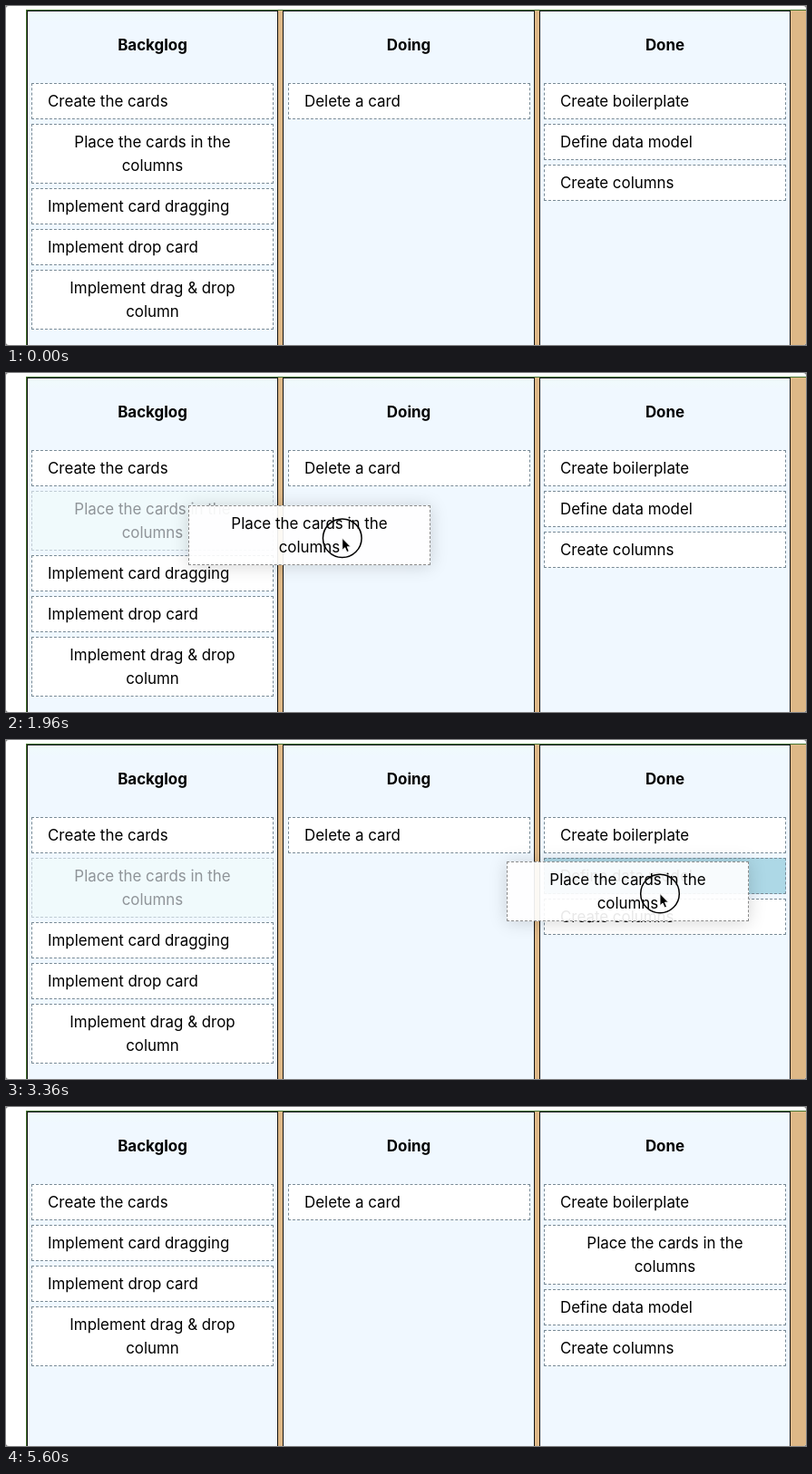
Animation, 882 px wide and 374 px high, one loop 6.02 s. Source, as an HTML page:

```html
<!DOCTYPE html>
<html lang="en">
<head>
<meta charset="utf-8">
<title>Card board</title>
<style>
  html, body { margin: 0; width: 100%; height: 100%; overflow: hidden; background: #777; }
  #stage {
    position: relative; width: 882px; height: 374px; overflow: hidden;
    background: #fff; border-radius: 3px;
    font: 16.9px/26px Inter, "Open Sans", sans-serif; color: #000;
  }
  #stage * { box-sizing: border-box; }
  #stage > *, .card { position: absolute; }
  #board { left: 22px; top: 4px; width: 880px; height: 400px; background: #deb887; border: 1px solid #44752f; }
  .col {
    top: 5px; height: 400px; border: 1px solid #111;
    background: linear-gradient(#f0fbfb, #f0f8ff 12px);
  }
  h2 { position: absolute; left: 0; right: 0; top: 24px; margin: 0; font: inherit; font-weight: 700; text-align: center; }
  .card {
    width: 267px; padding: 6px 17px; white-space: pre;
    background: #fff; border: 1px dashed #788a96;
  }
  .two { text-align: center; }
  .dim { opacity: .4; background: #f0fdfa; }
  .over { background: #add8e6; }
  #ghost {
    left: 0; top: 0; border-color: #8a8a8a;
    background: rgba(255, 255, 255, .91); box-shadow: 0 1px 18px rgba(0, 0, 0, .17);
  }
  #pointer { left: 0; top: 0; overflow: visible; }
</style>
</head>
<body>
<div id="stage">
  <div id="board"></div>
  <div id="ghost" class="card two"></div>
  <svg id="pointer" width="1" height="1">
    <circle id="ring" r="21.3" fill="none" stroke="#000" stroke-width="1.5"/>
    <path d="M0 0V13.2L3 10.5L5.1 15.4L7.5 14.4L5.4 9.6H9.4Z" fill="#000" stroke="#fff" stroke-width=".9"/>
  </svg>
</div>
<script>
const STEP = 70, LOOP = 6020;
const ENTER = 210, PRESS = 1470, LIFT = 1750, DROP = 4480, RELEASE = 4550, LEAVE = 5600;
const GRAB = { x: 169.3, y: 36 };
const CARD = { one: 40, two: 66, gap: 5 };

const linear = u => u;
const easeIn = u => u ** 1.6;
const easeOut = u => 1 - (1 - u) ** 3.2;

// The pointer rests between moves
const START = { x: 286, y: 253 };
const MOVES = [
  { from: ENTER, to: 630, x: 171, y: 144, ease: linear },
  { from: 700, to: 910, x: 219, y: 184, ease: linear },
  { from: 910, to: 1330, x: 196.5, y: 167, ease: linear },
  { from: 1610, to: 2100, x: 495, y: 193, ease: easeIn },
  { from: 2170, to: 2940, x: 684, y: 183, ease: easeOut },
  { from: 2940, to: 3780, x: 758, y: 156, ease: linear },
  { from: 3780, to: 4130, x: 767, y: 146, ease: linear },
  { from: 4970, to: 5180, x: 604, y: 274, ease: linear },
  { from: 5250, to: LEAVE, x: 460, y: 374, ease: linear }
];

const MOVED = 'Place the cards in the\ncolumns';
const COLUMNS = [
  ['Backglog', ['Create the cards', MOVED, 'Implement card dragging',
    'Implement drop card', 'Implement drag & drop\ncolumn']],
  ['Doing', ['Delete a card']],
  ['Done', ['Create boilerplate', 'Define data model', 'Create columns']]
];

const $ = id => document.getElementById(id);
const stage = $('stage'), ghost = $('ghost'), pointer = $('pointer'), ring = $('ring');
ghost.textContent = MOVED;

function add(parent, tag, cls, text = '') {
  const el = document.createElement(tag);
  el.className = cls;
  el.textContent = text;
  parent.append(el);
  return el;
}

const lists = COLUMNS.map(([title, texts], i) => {
  const shift = 282.5 * i, left = Math.floor(23 + shift);
  const col = add(stage, 'div', 'col');
  col.style.left = left + 'px';
  col.style.width = Math.ceil(300 + shift) - left + 'px';
  stage.insertBefore(col, ghost);
  add(col, 'h2', '', title);
  const cards = texts.map(text => add(col, 'div', text.includes('\n') ? 'card two' : 'card', text));
  return { col, cards, inset: Math.round(28 + shift) - left - 1 };
});
const [backlog, doing, done] = lists;
const moved = backlog.cards[1];
const [first, model, columns] = done.cards;

function stack({ col, inset }, cards) {
  let y = 79;
  for (const card of cards) {
    col.append(card);
    card.style.left = inset + 'px';
    card.style.top = y + 'px';
    y += (card.classList.contains('two') ? CARD.two : CARD.one) + CARD.gap;
  }
}

function arrange(dropped) {
  stack(backlog, backlog.cards.filter(card => !dropped || card !== moved));
  stack(doing, doing.cards);
  stack(done, dropped ? [first, moved, model, columns] : done.cards);
}

function pointerAt(t) {
  let p = START;
  for (const { from, to, x, y, ease } of MOVES) {
    if (t <= from) break;
    const k = ease(Math.min(1, (t - from) / (to - from)));
    p = { x: p.x + (x - p.x) * k, y: p.y + (y - p.y) * k };
  }
  return p;
}

const show = (el, on) => { el.style.display = on ? '' : 'none'; };
const place = (el, x, y) => { el.style.transform = `translate(${x}px, ${y}px)`; };

let wasDropped = null, last = -1;

function draw(t) {
  const dropped = t >= DROP;
  if (dropped !== wasDropped) arrange(wasDropped = dropped);

  const dragging = t >= LIFT && !dropped;
  show(pointer, t >= ENTER && t < LEAVE);
  show(ring, t >= PRESS && t < RELEASE);
  show(ghost, dragging);
  moved.classList.toggle('dim', dragging);

  const p = pointerAt(t);
  place(pointer, p.x, p.y);
  place(ghost, Math.round(p.x - GRAB.x), Math.round(p.y - GRAB.y));

  const over = top => dragging && p.x > 593 && p.y >= top && p.y < top + CARD.one;
  model.classList.toggle('over', over(130));
  columns.classList.toggle('over', over(175));
}

function loop() {
  const t = Math.floor(performance.now() % LOOP / STEP) * STEP;
  if (t !== last) draw(last = t);
  requestAnimationFrame(loop);
}
loop();
</script>
</body>
</html>
```
